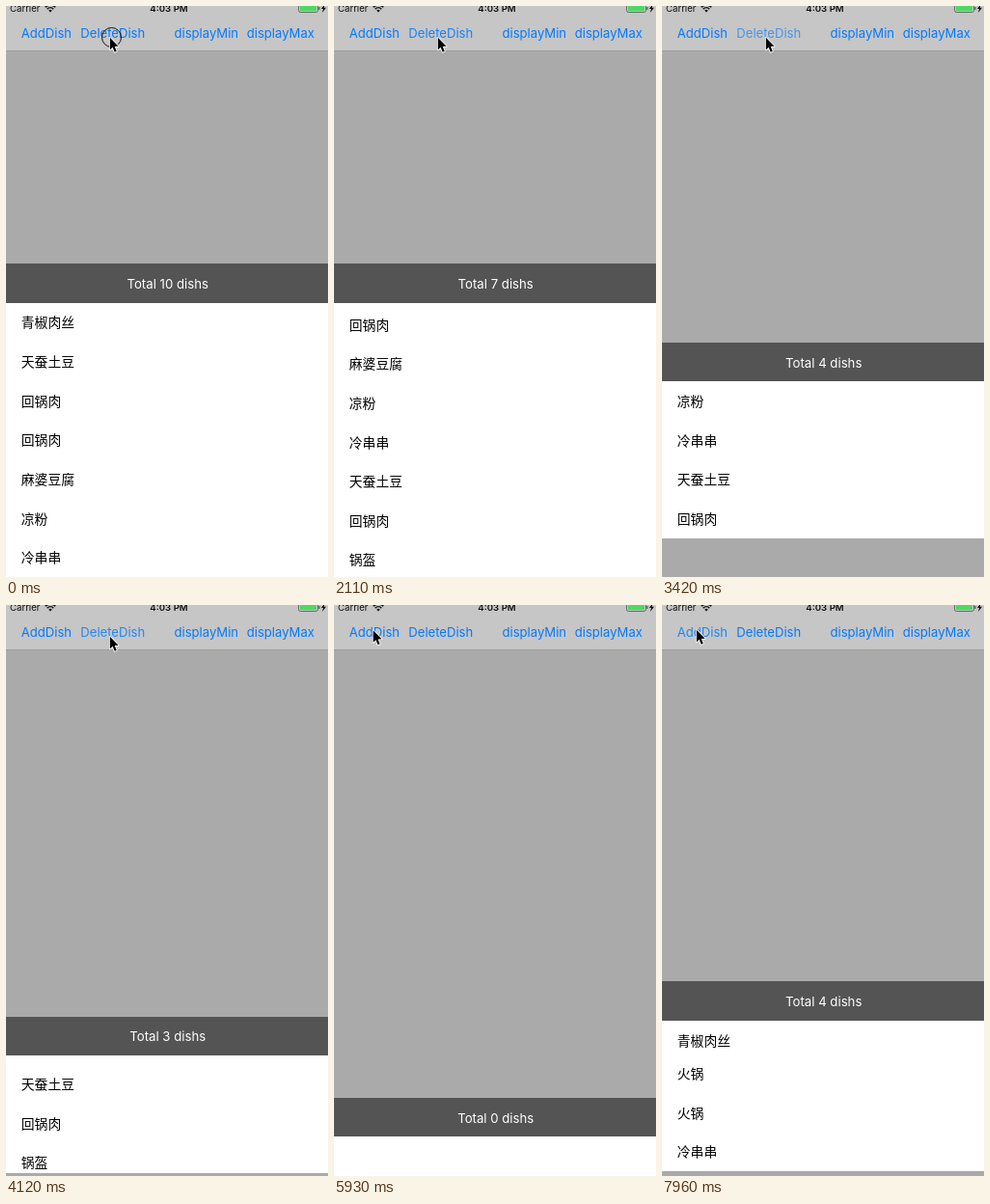
An HTML page with a canvas for the animation above (8000 ms loop, 334 by 592 pixels).

```html
<!DOCTYPE html>
<html lang="en">
<head>
<meta charset="utf-8">
<title>Dish list</title>
<style>
  html, body { margin: 0; width: 100%; height: 100%; overflow: hidden; background: #aaa; }
  canvas { display: block; width: 334px; height: 592px; }
</style>
</head>
<body>
<canvas id="stage"></canvas>
<script>
const W = 334, H = 592, LOOP = 8000;
const ROW = 40.64, MAX_ROWS = 7;
const SHEET_MS = 250, ROW_MS = 300, PRESS_MS = 112, FADE_MS = 400;
const LATIN = 'Inter, Roboto, sans-serif';
const CJK = '"Noto Sans CJK SC", "Noto Sans CJK", sans-serif';

const canvas = document.getElementById('stage');
const ctx = canvas.getContext('2d');
const dpr = window.devicePixelRatio || 1;
canvas.width = W * dpr;
canvas.height = H * dpr;

const dishes = ['青椒肉丝', '天蚕土豆', '回锅肉', '回锅肉', '麻婆豆腐',
  '凉粉', '冷串串', '天蚕土豆', '回锅肉', '锅盔'];
const deletes = [555, 1325, 1860, 2395, 2900, 3400, 3918, 4430, 4942, 5450];
const adds = [[6164, '冷串串'], [6687, '火锅'], [7214, '火锅'], [7741, '青椒肉丝']];
const taps = [
  ...deletes.map(at => ({ at, button: 'DeleteDish' })),
  ...adds.map(([at, dish]) => ({ at, dish, button: 'AddDish' }))
];
const buttons = [['AddDish', 15.7], ['DeleteDish', 77.3], ['displayMin', 174.5], ['displayMax', 249.7]];

const clamp = v => Math.min(1, Math.max(0, v));
const mix = (a, b, p) => a + (b - a) * p;

// cubic-bezier(.42, 0, .58, 1)
function ease(x) {
  x = clamp(x);
  let lo = 0, hi = 1;
  for (let i = 0; i < 20; i++) {
    const s = (lo + hi) / 2, r = 1 - s;
    if (1.26 * r * r * s + 1.74 * r * s * s + s * s * s < x) lo = s; else hi = s;
  }
  return lo * lo * (3 - 2 * lo);
}

function rect(x, y, w, h, color) {
  ctx.fillStyle = color;
  ctx.fillRect(x, y, w, h);
}

// Horizontal band with edges on whole pixels, so neighbours leave no seam.
function band(y, h, color) {
  const top = Math.round(y);
  rect(0, top, W, Math.round(y + h) - top, color);
}

function label(str, x, y, size, color, family = LATIN, align = 'left', weight = 400) {
  ctx.font = `${weight} ${size}px ${family}`;
  ctx.textAlign = align;
  ctx.fillStyle = color;
  ctx.fillText(str, x, y);
}

const rowsShown = n => Math.min(MAX_ROWS, Math.max(1, n));
const sheetTop = n => H - ROW * (rowsShown(n) + 1);

function stateAt(t) {
  let list = dishes, prev = dishes, last = null;
  for (const tap of taps) {
    if (tap.at > t) break;
    prev = list;
    list = tap.dish ? [tap.dish, ...list] : list.slice(1);
    last = tap;
  }
  return { list, prev, last };
}

function drawRow(dish, y) {
  band(y, ROW, '#fff');
  label(dish, 15.8, y + 25.9, 13.8, '#000', CJK);
}

function drawSheet(t) {
  const { list, prev, last } = stateAt(t);
  const age = last ? t - last.at : LOOP;
  const top = mix(sheetTop(prev.length), sheetTop(list.length), ease(age / SHEET_MS));
  const body = top + ROW;
  const p = ease(age / ROW_MS);

  ctx.save();
  ctx.beginPath();
  ctx.rect(0, 0, W, Math.round(body + ROW * rowsShown(list.length)));
  ctx.clip();
  if (!list.length) band(body, ROW, '#fff');
  if (last && last.dish) {
    drawRow(list[0], body);
    prev.forEach((dish, i) => drawRow(dish, body + (i + p) * ROW));
  } else {
    if (p < 1 && list.length) drawRow(prev[0], body);
    list.forEach((dish, i) => drawRow(dish, body + (i + 1 - p) * ROW));
  }
  ctx.restore();

  band(top, ROW, '#545454');
  label(`Total ${list.length} dishs`, 167.7, top + 25.9, 13.2, '#fff', LATIN, 'center');
}

function drawStatus() {
  label('Carrier', 4, 6, 9.6, '#111');
  label('4:03 PM', 169, 6, 9.6, '#111', LATIN, 'center', 600);

  ctx.strokeStyle = ctx.fillStyle = '#111';
  ctx.lineWidth = 1.5;
  for (const r of [7.4, 4.7]) {
    ctx.beginPath();
    ctx.arc(46, 6.5, r, -Math.PI * 0.75, -Math.PI * 0.25);
    ctx.stroke();
  }
  ctx.beginPath();
  ctx.moveTo(46, 6.5);
  ctx.arc(46, 6.5, 2.6, -Math.PI * 0.75, -Math.PI * 0.25);
  ctx.fill();

  ctx.lineWidth = 0.8;
  ctx.strokeStyle = '#555';
  ctx.beginPath();
  ctx.roundRect(303.5, -2, 20, 8.5, 2);
  ctx.stroke();
  rect(305, -1, 17, 6.2, '#4cd964');
  rect(324.3, 1, 1.2, 3, '#555');

  ctx.fillStyle = '#111';
  ctx.beginPath();
  [[330.5, -2], [327, 3], [329, 3], [328, 7], [332, 1.7], [329.8, 1.7]]
    .forEach(([x, y]) => ctx.lineTo(x, y));
  ctx.fill();
}

function buttonAlpha(name, t) {
  let dim = 0;
  for (const { at, button } of taps) {
    if (button !== name) continue;
    const d = t - at;
    if (d >= -PRESS_MS && d < 0) dim = Math.max(dim, clamp(1 + d / PRESS_MS));
    else if (d >= 0 && d < FADE_MS) dim = Math.max(dim, 1 - ease(d / FADE_MS));
  }
  return 1 - 0.36 * dim;
}

function drawBar(t) {
  rect(0, 0, W, 46, '#c6c6c6');
  rect(0, 46, W, 0.7, '#999');
  drawStatus();
  for (const [name, x] of buttons) {
    ctx.globalAlpha = buttonAlpha(name, t);
    label(name, x, 33, 13.1, '#007aff');
  }
  ctx.globalAlpha = 1;
}

function drawPointer(t) {
  const p = ease((t - 5620) / 380);
  const x = mix(107.8, 35.8, p), y = mix(32.8, 25.8, p);
  const pressed = t < 20 || taps.some(({ at }) => t >= at - PRESS_MS && t < at - 12);
  if (pressed) {
    ctx.beginPath();
    ctx.arc(x + 1.7, y - 0.3, 10, 0, Math.PI * 2);
    ctx.strokeStyle = '#111';
    ctx.lineWidth = 1;
    ctx.stroke();
  }
  ctx.beginPath();
  [[0, 0], [0, 12.6], [2.8, 10], [4.9, 15], [7, 14.1], [4.9, 9.3], [8.8, 9]]
    .forEach(([dx, dy]) => ctx.lineTo(x + dx, y + dy));
  ctx.closePath();
  ctx.lineJoin = 'round';
  ctx.strokeStyle = '#fff';
  ctx.lineWidth = 1.7;
  ctx.stroke();
  ctx.fillStyle = '#000';
  ctx.fill();
}

function draw(t) {
  ctx.setTransform(dpr, 0, 0, dpr, 0, 0);
  rect(0, 0, W, H, '#aaa');
  drawSheet(t);
  drawBar(t);
  drawPointer(t);
}

const start = performance.now();
function tick() {
  draw((performance.now() - start) % LOOP);
  requestAnimationFrame(tick);
}
tick();
</script>
</body>
</html>
```
